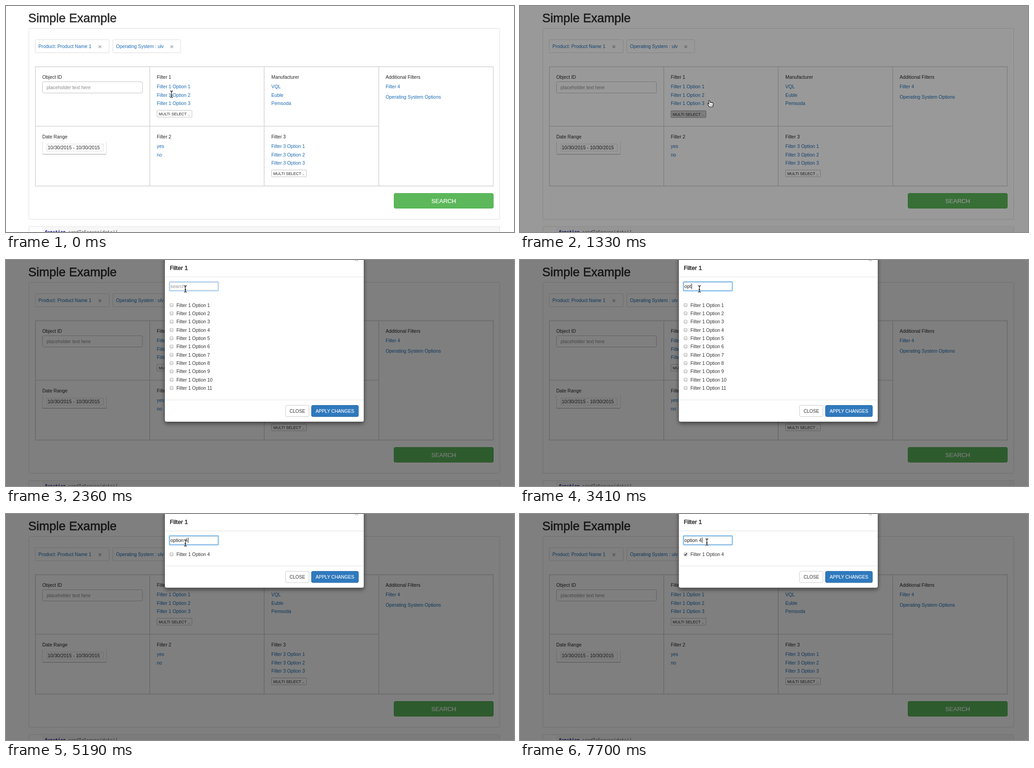
An HTML page for the animation above (8000 ms loop, 1120 px wide and 500 px high).

```html
<!DOCTYPE html>
<html lang="en">
<head>
<meta charset="utf-8">
<title>Filter dialog</title>
<style>
  html, body { margin: 0; width: 100%; height: 100%; overflow: hidden; background: #fff; }
  svg { display: block; }
  text { font-family: "Liberation Sans", Arial, sans-serif; white-space: pre; }
  .mono { font-family: "DejaVu Sans Mono", monospace; }
</style>
</head>
<body>
<svg id="stage" width="1120" height="500" viewBox="0 0 1120 500"></svg>
<script>
const LOOP = 8000;
const LINK = '#1c6cb4', INK = '#262626', LINE = '#dcdcdc';

const rect = (x, y, w, h, fill, stroke = 'none', r = 0, extra = '') =>
  `<rect x="${x}" y="${y}" width="${w}" height="${h}" rx="${r}" fill="${fill}" stroke="${stroke}" ${extra}/>`;
const text = (x, y, str, fill = INK, size = 10.4, extra = '') =>
  `<text x="${x}" y="${y}" font-size="${size}" fill="${fill}" ${extra}>${str}</text>`;
const line = (d, stroke = LINE, width = 1) =>
  `<path d="${d}" fill="none" stroke="${stroke}" stroke-width="${width}"/>`;
const group = (id, body, extra = '') => `<g id="${id}" ${extra}>${body}</g>`;
const medium = (color, width = 0.4) => `stroke="${color}" stroke-width="${width}"`;
const cross = (x, y, s = 2.9, color = '#b0b0b0') =>
  line(`M${x - s} ${y - s}L${x + s} ${y + s}M${x + s} ${y - s}L${x - s} ${y + s}`, color, 1.6);

const chip = (x, w, label, crossX) =>
  rect(x + .5, 74.5, w, 29, '#fff', LINE, 2) + text(x + 7.6, 93.3, label, LINK) + cross(crossX, 90);
const links = (x, y, labels) =>
  labels.map((label, i) => text(x, y + i * 18.7, label, LINK)).join('');
const multiSelect = (x, y, id) =>
  group(id, rect(x + .5, y + .5, 77, 15, '#fff', '#bdbdbd', 1) + text(x + 4.3, y + 11.2, 'MULTI SELECT ..', INK, 8.7));
const options = (n, from = 1) =>
  Array.from({ length: n }, (_, i) => `Option ${i + from}`);

function page() {
  return rect(0, 0, 1120, 500, '#fff')
    + text(49, 36.3, 'Simple Example', '#2b2b2b', 27, medium('#2b2b2b', .6))
    + rect(50.5, 49.5, 1038, 422.5, '#fff', '#ddd', 3)
    + chip(64, 163, 'Product: Product Name 1', 207)
    + chip(235, 149.5, 'Operating System : ulv', 365.5)
    + line('M64.8 134.3H1074.3V398.3H64.8ZM64.8 266H821.8M317 134V398M569.3 134V398M821.8 134V398', '#d8d8d8', 1.7)
    + text(80, 160.5, 'Object ID')
    + rect(80.5, 167.5, 220.5, 25, '#fff', '#c0c0c0', 3)
    + text(89.6, 184.3, 'placeholder text here', '#8b8b8b')
    + text(332.5, 160.5, 'Filter 1')
    + links(332.5, 182, options(3).map(o => 'Filter 1 ' + o))
    + multiSelect(332.5, 230.3, 'openButton')
    + text(585, 160.5, 'Manufacturer')
    + links(585, 182, ['VQL', 'Euble', 'Pemsoda'])
    + text(837, 160.5, 'Additional Filters')
    + text(837, 182, 'Filter 4', LINK)
    + text(837, 204.6, 'Operating System Options', LINK)
    + text(80, 292.6, 'Date Range')
    + line('M80.5 300V326Q80.5 328 82.5 328H219.5Q221.5 328 221.5 326V300', LINE)
    + line('M81 328.2H221', '#c8c8c8', 1.8)
    + rect(90.5, 305.5, 124, 15.5, '#fff', LINE)
    + text(92, 317.2, '10/30/2015 - 10/30/2015', INK, 10.55)
    + text(332.5, 292.6, 'Filter 2')
    + links(332.5, 314, ['yes', 'no'])
    + text(585, 292.6, 'Filter 3')
    + links(585, 314, options(3).map(o => 'Filter 3 ' + o))
    + multiSelect(585, 362.3, 'otherButton')
    + rect(855.5, 414.5, 219, 33, '#5cb85a', '#4cae4c', 3)
    + text(965, 435.6, 'SEARCH', '#fff', 13.1, 'text-anchor="middle" ' + medium('#fff', .2))
    + rect(50.5, 488, 1038, 40, '#fff', '#ddd', 1)
    + rect(80, 488.5, 1008, 20, '#f7f7f7')
    + text(85.5, 503, '<tspan fill="#000080" font-weight="bold">function</tspan> sendToServer(data){', '#444', 9.55, 'class="mono"');
}

const checkbox = y => rect(361.5, y - 3.7, 7, 7, 'url(#boxFill)', '#b2b2b2', 1);
const row = (y, label) => checkbox(y) + text(375.7, y + 3.8, 'Filter 1 ' + label, '#333');

function dialog() {
  return rect(350, -20, 439, 378, '#fff', 'rgba(0,0,0,.3)', 4, 'id="panel" filter="url(#shadow)"')
    + text(361, 21.6, 'Filter 1', '#2b2b2b', 13.1, medium('#2b2b2b', .5))
    + cross(772.7, -.6, 3.3, '#c4c4c4')
    + line('M350.5 37.5H788.5', '#e3e3e3')
    + rect(361.2, 49.5, 106, 17.5, '#fff', '#c9c9c9')
    + rect(360.2, 48.2, 108, 20, 'none', '#8cc2f0', 1.5, 'id="ring" stroke-width="2.4"')
    + text(362.6, 62, '', '#222', 10.6, 'id="query"')
    + rect(0, 52, 1, 12, '#111', 'none', 0, 'id="caret"')
    + group('fullList', options(11).map((o, i) => row(100 + i * 18.33, o)).join(''))
    + group('shortList', row(89.5, 'Option 4')
      + `<path id="tick" d="M363 89.3l1.7 2 3.1-4.9" fill="none" stroke="#222" stroke-width="1.5"/>`)
    + group('footer', line('M350.5 309.5H788.5', '#e3e3e3')
      + rect(616.5, 321.5, 51.5, 25, '#fff', '#c9c9c9', 3)
      + text(642.3, 337.8, 'CLOSE', '#333', 10.1, 'text-anchor="middle"')
      + rect(673.5, 321.5, 103.5, 25, '#2f79bd', '#296aa8', 3)
      + text(725.2, 337.8, 'APPLY CHANGES', '#fff', 10.2, 'text-anchor="middle" ' + medium('#fff', .15)));
}

// Pointer shapes, each drawn around its hot spot
const beamPath = 'M-3 -7Q0 -7 0 -5Q0 -7 3 -7M0 -5V5M-3 7Q0 7 0 5Q0 7 3 7M-1.7 2H1.7';
const pointers =
  group('beam', line(beamPath, '#fff', 2.8) + line(beamPath, '#111', 1.3))
  + group('arrow', '<path d="M0 0V14L3.2 11.1L5.5 16.3L8.2 15.1L5.9 10.1H10.3Z" fill="#111" stroke="#fff" stroke-width="1" stroke-linejoin="round"/>')
  + group('hand', '<path d="M-.4 14.5C-1 12-3.6 9.6-4.2 8.1C-4.6 6.9-3.2 6.4-2.2 7.4L-.6 9L-1.6 2C-1.7.2.4 0 .8 1.7L1.7 5.3C2.2 4.1 3.8 4.4 4 5.6C4.7 4.7 6 5 6.3 6.1C7.1 5.5 8.4 6 8.5 7.2C8.8 9.6 8.5 10.7 7.8 12.3L7.6 14.5Z" fill="#fff" stroke="#111" stroke-width="1.1" stroke-linejoin="round"/>'
    + line('M2.3 9.2V12M4.4 9.2V12M6.2 9.2V12', '#333', .7));

document.getElementById('stage').innerHTML = `
  <defs>
    <linearGradient id="boxFill" x2="0" y2="1"><stop stop-color="#f4f4f4"/><stop offset="1" stop-color="#dadada"/></linearGradient>
    <filter id="shadow" x="-10%" y="-15%" width="120%" height="135%">
      <feDropShadow dx="0" dy="3.7" stdDeviation="5" flood-color="#000" flood-opacity=".5"/>
    </filter>
  </defs>`
  + page() + rect(0, 0, 1120, 500, '#000', 'none', 0, 'id="backdrop"')
  + group('dialog', dialog()) + group('pointer', pointers);

// Timelines: [start ms, value...]; each entry holds until the next
const moves = [
  [0, 'beam', 365, 195], [150, 'beam', 366, 200], [300, 'hand', 369, 208], [450, 'hand', 373, 218],
  [600, 'arrow', 376, 229], [740, 'arrow', 376.5, 232], [880, 'arrow', 376.5, 233],
  [1330, 'hand', 417.5, 208.5], [1480, 'hand', 445, 150.5], [1630, 'hand', 437, 118],
  [1780, 'arrow', 424, 88], [1920, 'beam', 409, 67], [2070, 'beam', 399, 64], [2220, 'beam', 395.5, 64],
  [5490, 'beam', 388, 67], [5640, 'arrow', 366, 78], [5790, 'arrow', 326, 95], [5930, 'arrow', 289, 104],
  [6080, 'arrow', 298, 103], [6230, 'arrow', 332, 97], [6380, 'arrow', 354, 93], [6520, 'hand', 364, 90],
  [6970, 'hand', 367, 89], [7110, 'hand', 382, 81], [7260, 'beam', 400, 68], [7410, 'beam', 411, 62],
  [7560, 'beam', 412, 62]
];
const typing = [[0, ''], [3260, 'op'], [3410, 'opt'], [3560, 'opti'], [3700, 'optio'],
  [3850, 'option'], [4300, 'option '], [5190, 'option 4']];
const caretOn = [[0, 0], [2510, 1], [2960, 0], [3260, 1], [4740, 0], [5190, 1],
  [5790, 0], [6230, 1], [6820, 0], [7560, 1]];
const focusRing = [[0, 0], [2360, .6], [2510, 1], [6820, 0], [7410, .6], [7560, 1]];
const shade = [[0, 0], [1330, .4], [1480, .5]];
const buttonState = [[0, '#fff', 0], [600, '#e4e4e4', 0], [1180, '#bfbfbf', 2], [1330, '#d0d0d0', 1], [1480, '#fff', 0]];

const at = (track, t) => track.findLast(key => key[0] <= t).slice(1);
const el = id => document.getElementById(id);
const set = (id, name, value) => el(id).setAttribute(name, value);
const show = (id, on) => set(id, 'visibility', on ? 'inherit' : 'hidden');

function render(t) {
  const [kind, x, y] = at(moves, t);
  set('pointer', 'transform', `translate(${x} ${y})`);
  ['beam', 'arrow', 'hand'].forEach(id => show(id, id === kind));

  const [fill, push] = at(buttonState, t);
  const face = el('openButton').firstChild;
  face.setAttribute('fill', fill);
  face.setAttribute('stroke', push ? '#8e8e8e' : '#bdbdbd');
  set('openButton', 'transform', `translate(0 ${push})`);

  set('backdrop', 'opacity', at(shade, t)[0]);
  set('dialog', 'visibility', t >= 1480 ? 'visible' : 'hidden');

  const [typed] = at(typing, t);
  const query = el('query');
  query.textContent = typed || 'search';
  query.setAttribute('fill', typed ? '#222' : '#979797');
  set('caret', 'x', 363 + (typed ? query.getComputedTextLength() + .4 : 0));
  show('caret', at(caretOn, t)[0]);
  set('ring', 'opacity', at(focusRing, t)[0]);

  const filtered = t >= 5190;
  show('fullList', !filtered);
  show('shortList', filtered);
  show('tick', filtered && t >= 6820);
  set('footer', 'transform', `translate(0 ${filtered ? -194.7 : 0})`);
  set('panel', 'height', filtered ? 183.3 : 378);
}

const start = performance.now();
function tick() {
  render((performance.now() - start) % LOOP);
  requestAnimationFrame(tick);
}
tick();
</script>
</body>
</html>
```
